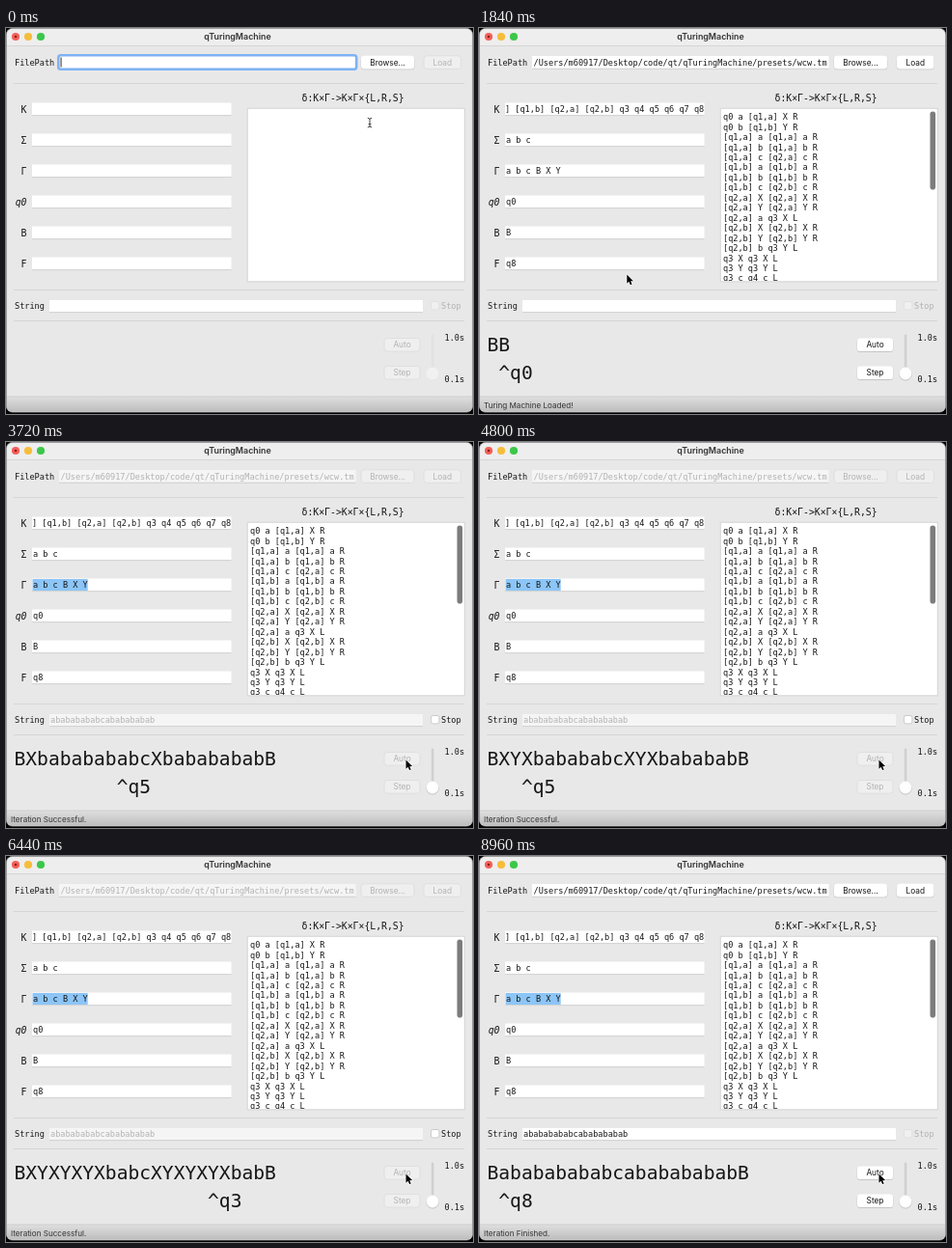
An HTML page with a canvas that plays this animation: 484 px wide and 400 px high, repeating every 9 s.

```html
<!DOCTYPE html>
<html lang="en">
<head>
<meta charset="utf-8">
<title>qTuringMachine</title>
<style>
html, body { margin: 0; width: 100%; height: 100%; overflow: hidden; background: #000; }
canvas { display: block; width: 484px; height: 400px; }
</style>
</head>
<body>
<canvas id="stage"></canvas>
<script>
const W = 484, H = 400, LOOP = 9000, TICK = 40;
const canvas = document.getElementById('stage');
const c = canvas.getContext('2d');
const dpr = window.devicePixelRatio || 1;
canvas.width = W * dpr;
canvas.height = H * dpr;

const MONO = '"DejaVu Sans Mono", monospace';
const SANS = 'Inter, "Noto Sans CJK SC", "Noto Sans CJK", sans-serif';
const CODE = '8.57px ' + MONO, LABEL = '9.8px ' + MONO, TAPE = '19.6px ' + MONO;
const UI = '8.3px ' + SANS, BOLD = '600 8px ' + SANS;
const INK = '#161616', FADED = '#b2b2b2', BLUE = '#1a7cf2';
const CELL = 5.16;

const T = { open: 400, pick: 800, accept: 1160, close: 1280, load: 1600,
  focus: 1920, type: 2230, key: 44, run: 3440, step: 20 };

const PATH = '/Users/m60917/Desktop/code/qt/qTuringMachine/presets/wcw.tm';
const WORD = 'ababababab';
const INPUT = WORD + 'c' + WORD;
const FIELDS = [
  ['K', '] [q1,b] [q2,a] [q2,b] q3 q4 q5 q6 q7 q8'],
  ['Σ', 'a b c'], ['Γ', 'a b c B X Y'], ['q0', 'q0'], ['B', 'B'], ['F', 'q8']
];

function buildRules() {
  const rules = [];
  const add = (q, s, p, w, d) => rules.push([q, s, p, w, d]);
  const pairs = [['a', 'X'], ['b', 'Y']];
  for (const [s, m] of pairs) add('q0', s, `[q1,${s}]`, m, 'R');
  for (const [s] of pairs) {
    const q = `[q1,${s}]`;
    add(q, 'a', q, 'a', 'R');
    add(q, 'b', q, 'b', 'R');
    add(q, 'c', `[q2,${s}]`, 'c', 'R');
  }
  for (const [s, m] of pairs) {
    const q = `[q2,${s}]`;
    add(q, 'X', q, 'X', 'R');
    add(q, 'Y', q, 'Y', 'R');
    add(q, s, 'q3', m, 'L');
  }
  for (const [, m] of pairs) add('q3', m, 'q3', m, 'L');
  add('q3', 'c', 'q4', 'c', 'L');
  for (const [s, m] of pairs) {
    add('q4', s, 'q5', s, 'L');
    add('q5', s, 'q5', s, 'L');
    add('q5', m, 'q0', m, 'R');
    add('q4', m, 'q6', m, 'R');
    add('q6', m, 'q6', m, 'R');
    add('q7', m, 'q7', s, 'L');
  }
  add('q6', 'c', 'q6', 'c', 'R');
  add('q6', 'B', 'q7', 'B', 'L');
  add('q7', 'c', 'q7', 'c', 'L');
  add('q7', 'B', 'q8', 'B', 'R');
  return rules;
}

function simulate(rules, input) {
  const delta = {};
  for (const [q, s, ...rest] of rules) delta[q + ' ' + s] = rest;
  const tape = [...('B' + input + 'B')];
  let state = 'q0', head = 1;
  const log = [{ tape: tape.join(''), state, head }];
  for (let rule; (rule = delta[state + ' ' + tape[head]]);) {
    state = rule[0];
    tape[head] = rule[1];
    head += rule[2] === 'R' ? 1 : -1;
    log.push({ tape: tape.join(''), state, head });
  }
  return log;
}

const RULES = buildRules();
const LOG = simulate(RULES, INPUT);
T.done = T.run + (LOG.length - 1) * T.step;

// Drawing helpers
function text(s, x, y, font = CODE, color = INK, align = 'left') {
  c.font = font;
  c.fillStyle = color;
  c.textAlign = align;
  c.fillText(s, x, y);
}
function rect(x, y, w, h, color) {
  c.fillStyle = color;
  c.fillRect(x, y, w, h);
}
function round(x, y, w, h, r, fill, stroke, line = 0.7) {
  c.beginPath();
  c.roundRect(x, y, w, h, r);
  if (fill) { c.fillStyle = fill; c.fill(); }
  if (stroke) { c.strokeStyle = stroke; c.lineWidth = line; c.stroke(); }
}
function disc(x, y, r, fill, stroke) {
  c.beginPath();
  c.arc(x, y, r, 0, 7);
  if (fill) { c.fillStyle = fill; c.fill(); }
  if (stroke) { c.strokeStyle = stroke; c.lineWidth = 0.8; c.stroke(); }
}
function lines(color, width, ...paths) {
  c.strokeStyle = color;
  c.lineWidth = width;
  c.beginPath();
  for (const p of paths) {
    c.moveTo(p[0], p[1]);
    for (let i = 2; i < p.length; i += 2) c.lineTo(p[i], p[i + 1]);
  }
  c.stroke();
}
function fade(y0, y1, from, to) {
  const g = c.createLinearGradient(0, y0, 0, y1);
  g.addColorStop(0, from);
  g.addColorStop(1, to);
  return g;
}

function button(label, x, y, w, on) {
  if (on) {
    round(x - 0.3, y + 0.5, w + 0.6, 14, 3.5, '#c4c4c4');
    round(x, y, w, 13.6, 3.2, '#fff');
  } else {
    round(x, y, w, 13.6, 3.2, '#efefef', '#dadada');
  }
  text(label, x + w / 2, y + 9.9, UI, on ? INK : FADED, 'center');
}
function field(x, y, w, h, focused, on = true) {
  if (focused) {
    round(x - 0.7, y - 0.7, w + 1.4, h + 1.4, 2.5, '#fff', '#7fb2f3', 2.6);
    return;
  }
  rect(x, y, w, h, on ? '#fff' : '#f5f5f5');
  rect(x, y + h - 0.2, w, 0.8, '#c9c9c9');
}

function drawFrame() {
  rect(0, 0, W, H, '#000');
  round(0.5, 0.5, 483, 397.5, 6, '#e8e8e8', '#a8a8a8', 0.8);
  round(1, 1, 482, 17, [6, 6, 0, 0], '#eeeeee');
  rect(1, 18, 482, 0.8, '#d2d2d2');
  ['#f4605a', '#f6bd3b', '#3cc74a'].forEach((k, i) => disc(10 + 13 * i, 9, 4.1, k));
  disc(10, 9, 1.3, '#8d1f18');
  text('qTuringMachine', 240, 12.2, '600 8.9px ' + SANS, '#333', 'center');
  for (const y of [57, 271, 303]) rect(8, y, 467, 0.9, '#d3d3d3');
  round(1, 382, 482, 15.5, [0, 0, 6, 6], fade(382, 398, '#dfdfdf', '#bcbcbc'));
  rect(1, 381.6, 482, 0.8, '#c6c6c6');
}

function drawForm(t, loaded, running, typed) {
  const named = t >= T.accept;
  text('FilePath', 9, 38.8);
  field(55, 29, 307.5, 13, t < T.open, !running);
  if (named) text(PATH, 56.5, 38.6, CODE, running ? FADED : INK);
  else if (t < T.open) rect(56.6, 30.5, 0.9, 10, INK);
  button('Browse...', 368, 28.8, 55, !running);
  button('Load', 433, 28.8, 38.5, named && !running);

  FIELDS.forEach(([name, value], i) => {
    const y = 84 + 32 * i;
    text(name, 21.5, y + 3.7, (name === 'q0' ? 'italic ' : '') + LABEL, INK, 'right');
    field(27, y - 6.5, 206.5, 13);
    if (!loaded) return;
    if (name === 'Γ' && t >= T.run) rect(27.5, y - 6, 57.2, 12, '#8cc5f7');
    c.save();
    c.beginPath();
    c.rect(27, y - 7, 206, 14);
    c.clip();
    text(value, 28 - (i ? 0 : 1), y + 3);
    c.restore();
  });

  text('δ:K×Γ->K×Γ×{L,R,S}', 306.5, 76, LABEL);
  round(250.3, 83.3, 225, 179.5, 0, '#fff', '#c8c8c8');
  if (loaded) {
    c.save();
    c.beginPath();
    c.rect(251, 84, 223, 178);
    c.clip();
    RULES.slice(0, 17).forEach((r, i) => text(r.join(' '), 253, 95.2 + 10.45 * i));
    c.restore();
    round(467.5, 86.5, 5.6, 81, 2.8, '#7c7c7c');
  }

  const focused = t >= T.focus && t < T.run;
  text('String', 9, 291);
  if (focused) field(44.5, 282, 388, 12.5, true);
  else field(45, 282, 387, 12.5, false, !running);
  const s = INPUT.slice(0, typed);
  text(s, 46, 291, CODE, running ? FADED : INK);
  if (focused) rect(46.2 + s.length * CELL, 283, 0.9, 10.5, INK);
  round(440.5, 283.5, 8.4, 8.4, 2, running ? '#fff' : '#f0f0f0', running ? '#b8b8b8' : '#dcdcdc');
  text('Stop', 451, 291, CODE, running ? INK : FADED);
}

function drawControls(t, loaded, running, typed) {
  if (loaded) {
    const n = Math.min(LOG.length - 1, Math.floor((t - T.run) / T.step));
    const now = t >= T.run ? LOG[n] : { tape: 'B' + INPUT.slice(0, typed) + 'B', state: 'q0', head: 1 };
    text(now.tape, 8.5, 334.6, TAPE);
    text(' '.repeat(now.head) + '^' + now.state, 8.5, 363.6, TAPE);
  }
  button('Auto', 392, 321.5, 37, loaded && !running);
  button('Step', 392, 350.5, 37, loaded && !running);
  round(440.8, 317.5, 2.6, 48, 1.3, loaded ? '#d0d0d0' : '#e2e2e2');
  if (loaded) disc(442, 358.6, 6.8, '#c9c9c9');
  disc(442, 358, 6.4, loaded ? '#fff' : '#f1f1f1');
  text('1.0s', 454.5, 324.4);
  text('0.1s', 454.5, 366.8);

  let status = '';
  if (t >= T.done) status = 'Iteration Finished.';
  else if (t >= T.run) status = 'Iteration Successful.';
  else if (loaded) status = 'Turing Machine Loaded!';
  else if (t >= T.accept) status = 'Valid File Name,Press "Load" to load this Turing Machine...';
  text(status, 5, 393.6, '8.1px ' + SANS, '#333');
}

// Small line icons centred on x, y
const ICONS = {
  clock(x, y) { disc(x, y, 4.2, null, BLUE); lines(BLUE, 0.8, [x, y - 2.5, x, y, x + 2, y + 1]); },
  apps(x, y) { lines(BLUE, 0.9, [x - 4, y + 4, x, y - 4, x + 4, y + 4], [x - 4, y + 1.4, x + 4, y + 1.4]); },
  desk(x, y) { round(x - 4.5, y - 3.5, 9, 7, 1, null, BLUE, 0.9); rect(x - 4.5, y + 1.6, 9, 1, BLUE); },
  page(x, y) { round(x - 3.2, y - 4.2, 6.4, 8.4, 1, null, BLUE, 0.9); lines(BLUE, 0.8, [x + 0.5, y - 4, x + 0.5, y - 1.2, x + 3, y - 1.2]); },
  folder(x, y) { round(x - 4.5, y - 3, 9, 6.5, 1, null, BLUE, 0.9); lines(BLUE, 0.9, [x - 4, y - 3.6, x - 0.6, y - 3.6], [x - 4.4, y - 1.3, x + 4.4, y - 1.3]); },
  down(x, y) { disc(x, y, 4.2, null, BLUE); lines(BLUE, 0.9, [x, y - 2.4, x, y + 2.2], [x - 1.8, y + 0.4, x, y + 2.2, x + 1.8, y + 0.4]); },
  cloud(x, y) {
    c.beginPath();
    c.arc(x - 2.6, y + 1.2, 2, Math.PI / 2, Math.PI * 1.5);
    c.arc(x, y - 0.6, 2.7, Math.PI * 1.05, Math.PI * 1.9);
    c.arc(x + 2.8, y + 1.3, 1.9, -Math.PI / 2, Math.PI / 2);
    c.closePath();
    c.strokeStyle = '#356f78';
    c.lineWidth = 0.9;
    c.stroke();
  },
  shared(x, y) { round(x - 5, y - 3.4, 10, 7, 1, null, '#2f5f78', 0.9); rect(x - 5, y - 3.4, 10, 1.6, '#2f5f78'); disc(x + 3, y + 1.6, 1.6, '#2f5f78'); }
};
const PLACES = [
  ['clock', 'Recents', 70], ['apps', 'Applicati...', 88.5], ['desk', 'Desktop', 107],
  ['page', 'Documents', 125], ['folder', 'lab_docs', 143.3], ['folder', 'code', 161.5],
  ['down', 'Downloads', 180], ['cloud', 'Velumo云盘', 219.3], ['shared', 'Shared', 237.8]
];
const FILES = [
  ['一进制转二进制.tm', 479], ['wcw.tm', 567], ['n个0_n个1.tm', 196], ['m-n.tm', 231], ['log2(n).tm', 240]
];

function drawSidebar(t) {
  rect(8, 40, 93, 293, '#dcdcdc');
  text('个人收藏', 18, 57.8, '600 7.8px ' + SANS, '#8a8a8a');
  text('Velumo', 18, 207, '600 7.6px ' + SANS, '#8a8a8a');
  for (const [icon, name, y] of PLACES) {
    ICONS[icon](25, y);
    text(name, 34, y + 3, UI, '#2c2c2c');
  }
  round(94, 50, 5.4, 140, 2.7, '#b1b1b1');
  if (t < T.accept) return;
  const g = c.createLinearGradient(0, 0, 96, 0);
  ['#dedede', '#d6d2d2', '#e2d2d2', '#d2dede', '#dadada', '#dedede']
    .forEach((k, i) => g.addColorStop(i / 5, k));
  rect(0, 258, 96, 98, g);
  for (const [x, k] of [[22, '#e8c4c4'], [35, '#c8dcdf'], [48, '#e6cbcb'], [61, '#c9dbdc']]) rect(x, 258, 1.6, 66, k);
}

function drawToolbar() {
  round(115, 53, 32, 14, 3, '#fff', '#dcdcdc');
  rect(131, 54, 0.7, 12, '#e2e2e2');
  lines('#b4b4b4', 1.1, [124.5, 56.5, 121.3, 60, 124.5, 63.5], [137.5, 56.5, 140.7, 60, 137.5, 63.5]);
  round(150, 53, 33.5, 14, 3, '#fff', '#dcdcdc');
  for (const y of [57.2, 60, 62.8]) {
    rect(157.5, y - 0.5, 1.2, 1.1, '#555');
    rect(160, y - 0.5, 6.5, 1, '#555');
  }
  round(187, 53, 29, 14, 3, '#fff', '#dcdcdc');
  for (let i = 0; i < 6; i++) {
    round(193 + (i % 3) * 3.6, 56.8 + (i > 2 ? 3.8 : 0), 2.6, 2.6, 0.4, null, '#666', 0.7);
  }
  for (const x of [174, 208]) lines('#555', 0.9, [x - 2, 59, x, 61, x + 2, 59]);
  round(248, 53, 135, 14, 3, '#fff', '#dcdcdc');
  round(253, 56.5, 9.5, 7, 1, '#4fb6ea');
  rect(253.5, 55.6, 4, 1.5, '#4fb6ea');
  text('presets', 267.5, 62.9, UI);
  round(372, 55, 10, 10.6, 2.4, '#0a68e6');
  lines('#fff', 1, [375, 59, 377, 57, 379, 59], [375, 61.8, 377, 63.8, 379, 61.8]);
  round(417, 53, 90, 14, 3, '#fff', '#dcdcdc');
  disc(424.5, 59.3, 2.8, null, '#555');
  lines('#555', 1, [426.6, 61.4, 428.8, 63.8]);
  text('搜索', 435, 63, UI, '#a8a8a8');
}

function drawFiles(picked) {
  const small = '7.8px ' + SANS;
  text('名称', 133, 93, small, '#555');
  text('大小', 313, 93, small, '#555');
  text('种类', 376, 93, small, '#555');
  text('添加日期', 451, 93, '600 7.6px ' + SANS, '#222');
  for (const x of [307, 371, 446]) rect(x, 84, 0.7, 12, '#dcdcdc');
  rect(101, 98, 400, 0.8, '#dedede');
  for (let i = 1; i < 14; i += 2) rect(101, 103 + 13 * i, 400, 13, '#f3f4f4');
  FILES.forEach(([name, size], i) => {
    const y = 103 + 13 * i, on = picked && i === 1;
    if (on) rect(101, y, 400, 12.8, '#0757d4');
    round(121.5, y + 2, 7, 9, 0.6, '#fafafa', '#bdbdbd', 0.6);
    rect(123, y + 6, 4, 0.6, '#c8c8c8');
    text(name, 133, y + 9.3, (on ? '600 ' : '') + UI, on ? '#fff' : '#333');
    const color = on ? '#fff' : '#666';
    text(size + ' 字节', 365.5, y + 9.3, UI, color, 'right');
    text('Document', 376, y + 9.3, UI, color);
    text('2021年11月', 451, y + 9.3, UI, color);
  });
}

function drawDialog(t) {
  c.save();
  c.shadowColor = 'rgba(0,0,0,0.55)';
  c.shadowBlur = 32 * dpr;
  c.shadowOffsetY = 12 * dpr;
  round(8, 40, 520, 293, 5, '#fff');
  c.restore();
  c.save();
  c.beginPath();
  c.rect(0, 40, W, 317);
  c.clip();
  drawSidebar(t);
  drawToolbar();
  drawFiles(t >= T.pick);
  rect(101, 285, 400, 7.5, '#f6f6f6');
  round(104, 286.3, 400, 4.8, 2.4, '#a9a9a9');
  rect(101, 293, 400, 40, '#fcfcfc');
  rect(101, 292.5, 400, 0.7, '#dedede');
  for (const [s, x, w] of [['新建文件夹', 114.5, 57.5], ['取消', 418, 47]]) {
    round(x, 306, w, 13.8, 3.2, '#fff', '#cfcfcf');
    text(s, x + w / 2, 316, '8.6px ' + SANS, INK, 'center');
  }
  round(470.5, 306, 47, 13.8, 3.2, t >= T.accept ? '#0a5fd8' : '#1677f5');
  c.restore();
}

// Pointer stops: time, x, y
const STOPS = [
  [0, 377, 98], [60, 377, 98], [280, 396, 37], [520, 396, 37], [740, 150, 122], [840, 150, 122],
  [1100, 480, 316], [1280, 480, 316], [1520, 452, 37], [1660, 452, 37], [1900, 98, 296],
  [3120, 98, 296], [3360, 414.5, 329.5], [LOOP, 414.5, 329.5]
];
function drawPointer(t) {
  const i = STOPS.findIndex(s => s[0] > t);
  const a = STOPS[i - 1], b = STOPS[i];
  const u = (t - a[0]) / (b[0] - a[0]), e = u * u * (3 - 2 * u);
  const x = a[1] + (b[1] - a[1]) * e, y = a[2] + (b[2] - a[2]) * e;
  if (t < T.open && y > 83) {
    for (const [k, w] of [['#fff', 2], ['#333', 0.9]]) {
      lines(k, w, [x - 2.2, y - 4.8, x, y - 3.8, x + 2.2, y - 4.8], [x, y - 4, x, y + 4.5],
        [x - 2.2, y + 5, x, y + 4, x + 2.2, y + 5], [x - 1.4, y + 1.6, x + 1.4, y + 1.6]);
    }
    return;
  }
  c.beginPath();
  [[0, 0], [0, 9.2], [2.1, 7.3], [3.6, 10.6], [5.2, 9.9], [3.8, 6.7], [6.6, 6.6]]
    .forEach(([dx, dy]) => c.lineTo(x + dx, y + dy));
  c.closePath();
  c.lineJoin = 'round';
  c.strokeStyle = '#fff';
  c.lineWidth = 1.4;
  c.stroke();
  c.fillStyle = '#000';
  c.fill();
}

function draw(t) {
  const loaded = t >= T.load;
  const running = t >= T.run && t < T.done;
  const typed = Math.max(0, Math.min(INPUT.length, Math.floor((t - T.type) / T.key) + 1));
  c.setTransform(dpr, 0, 0, dpr, 0, 0);
  drawFrame();
  drawForm(t, loaded, running, typed);
  drawControls(t, loaded, running, typed);
  if (t >= T.open && t < T.close) drawDialog(t);
  drawPointer(t);
}

const start = performance.now();
function tick() {
  const t = (performance.now() - start) % LOOP;
  draw(Math.floor(t / TICK + 0.01) * TICK % LOOP);
  requestAnimationFrame(tick);
}
tick();
</script>
</body>
</html>
```
